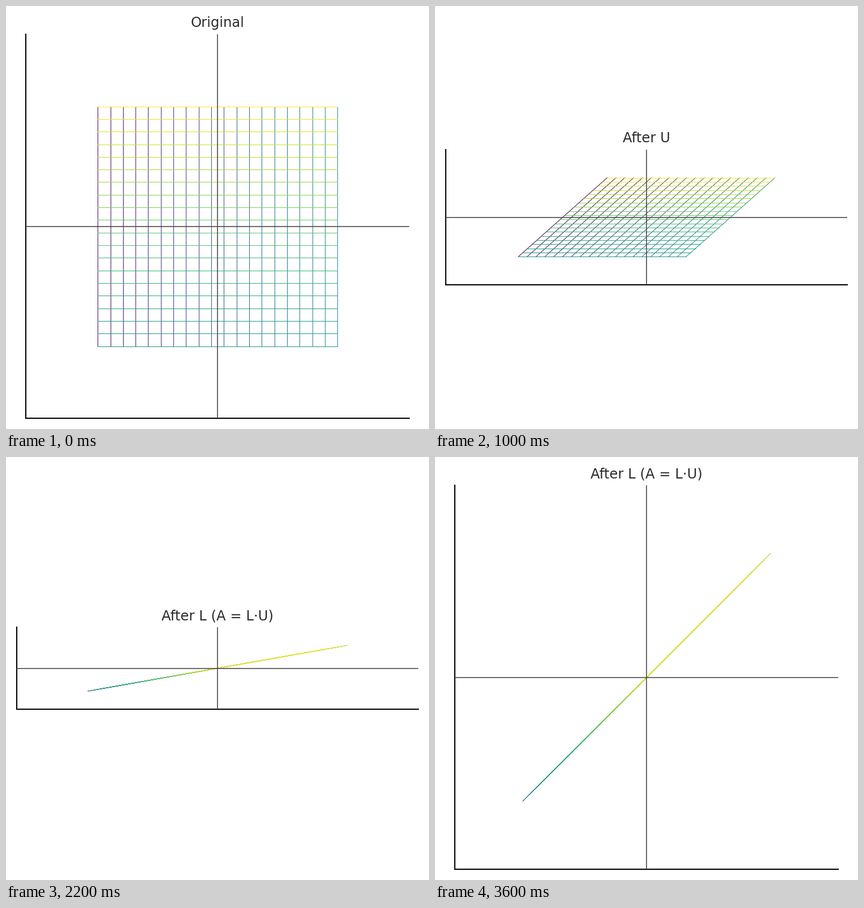
Write a matplotlib script that moves like this. It is 748 by 748 pixels and loops after 3.7 s.

```python
import numpy as np
import matplotlib.pyplot as plt
from matplotlib.animation import FuncAnimation

SIZE, DPI = 748, 88
STEPS, LINES = 18, 20
LEFT, TOP, SIDE = 18.95, 18.3, 710.5   # drawing area, px from the top left
TITLE = 32.1                           # room the title takes above the axes
SLOT_W, SLOT_H = 0.775 * SIZE, 0.77 * SIZE

U = np.array([[1, 1], [0, 0]])
L = np.array([[1, 0], [1, 1]])


def pt(px):
    return px * 72 / DPI


def mix(m, s):
    return (1 - s) * np.eye(2) + s * m


def state(frame):
    """Title and matrix for one frame."""
    if frame == 0:
        return "Original", np.eye(2)
    s = (frame - 1) % STEPS / (STEPS - 1)
    if frame <= STEPS:
        return "After U", mix(U, s)
    return "After L (A = L·U)", mix(L, s) @ U


def layout(xlim, ylim):
    """Centred equal-aspect box that leaves space for the title."""
    ratio = ylim / xlim
    slot = min(SLOT_H, SLOT_W * ratio)
    top = TOP + max(0, TITLE - (SLOT_H - slot) / 2)
    room = TOP + SIDE - top
    w = min(SIDE, room / ratio)
    h = w * ratio
    x = LEFT + (SIDE - w) / 2
    bottom = top + (room + h) / 2
    return [x / SIZE, 1 - bottom / SIZE, w / SIZE, h / SIZE]


fig = plt.figure(figsize=(SIZE / DPI, SIZE / DPI), dpi=DPI, facecolor="white")
ax = fig.add_axes([0.1, 0.1, 0.8, 0.8])
ax.set_xticks([])
ax.set_yticks([])
ax.spines[["top", "right"]].set_visible(False)
for side in ("left", "bottom"):
    ax.spines[side].set(linewidth=pt(2.1), color="black")

ticks = np.linspace(-1, 1, LINES)
ends = np.array([-1.0, 1.0])
grid = [np.array([[v, v], ends]) for v in ticks]
grid += [np.array([ends, [v, v]]) for v in ticks]
colors = plt.cm.viridis(np.linspace(0, 1, 2 * LINES))
lines = [ax.plot([], [], color=c, lw=pt(0.99))[0] for c in colors]

ax.axhline(0, color="#484545", lw=pt(1.6), zorder=3)
ax.axvline(0, color="#484545", lw=pt(1.6), zorder=3)
title = ax.set_title("", fontsize=pt(24.2), pad=pt(13.2), y=1.0,
                     color="#2b2b2b", fontname="DejaVu Sans")


def draw(frame):
    text, m = state(frame)
    xlim, ylim = 1.5 * np.abs(m).sum(axis=1) + 0.1
    ax.set_position(layout(xlim, ylim))
    ax.set_xlim(-xlim, xlim)
    ax.set_ylim(-ylim, ylim)
    title.set_text(text)
    for line, p in zip(lines, grid):
        line.set_data(*(m @ p))
    return lines


anim = FuncAnimation(fig, draw, frames=2 * STEPS + 1, interval=100,
                     repeat=True, repeat_delay=0, blit=False)
plt.show()
```
